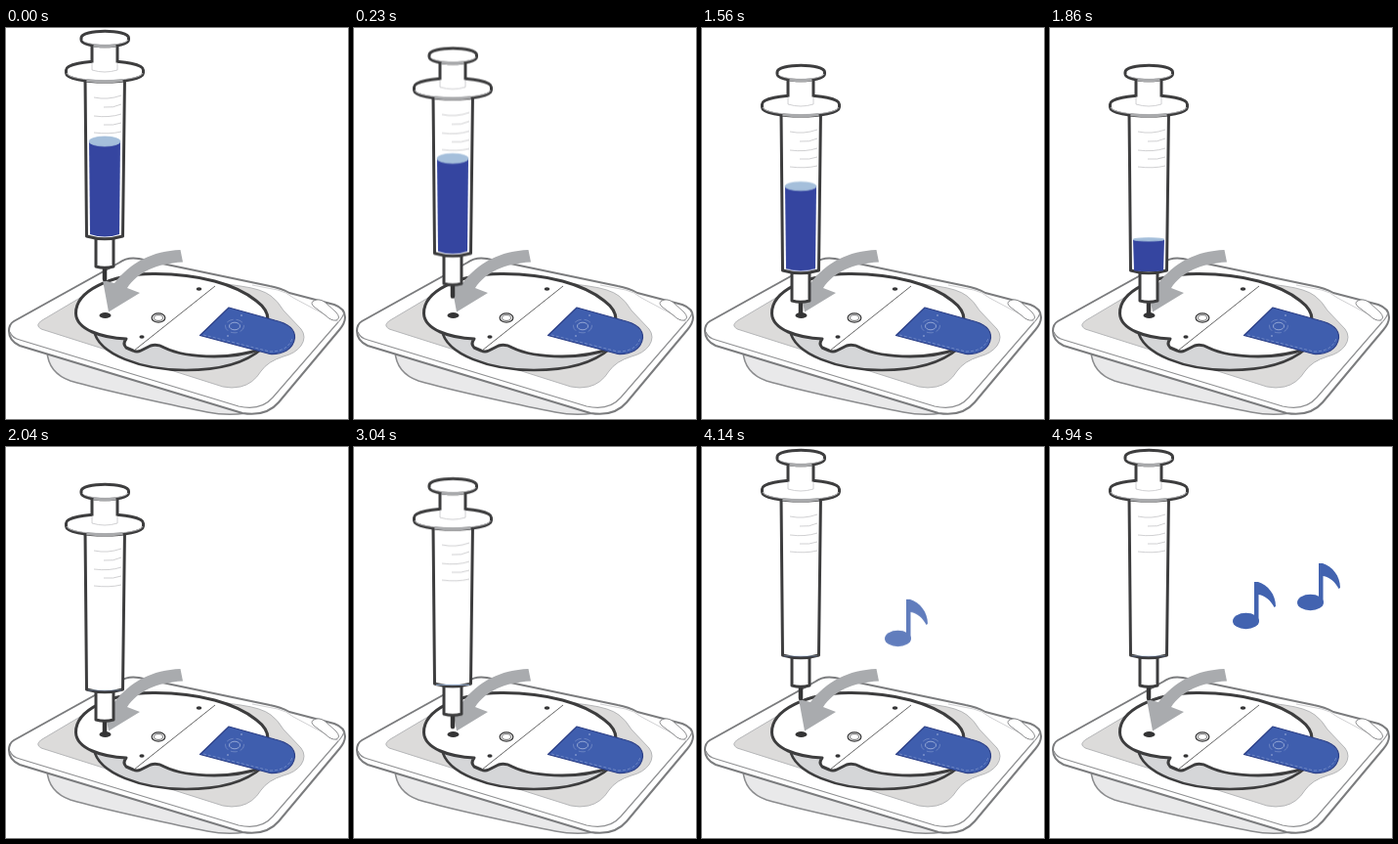
Recreate the animation shown at these times as an HTML page. Size 350 px wide and 400 px high, loop 6.94 s.

```html
<!DOCTYPE html>
<html lang="en">
<head>
<meta charset="utf-8">
<title>Filling a cartridge</title>
<style>
html, body { margin: 0; width: 100%; height: 100%; overflow: hidden; background: #fff; }
svg { display: block; width: 350px; height: 400px; }
.rim { fill: #fff; stroke: #7b7c7e; stroke-width: 2; stroke-linejoin: round; }
.thin { fill: none; stroke: #8f9092; stroke-width: 1.2; }
.bold { fill: #fff; stroke: #3d3d3e; stroke-width: 3; stroke-linejoin: round; }
.lip { fill: none; stroke: #a9aaac; stroke-width: 3; }
.mark { fill: none; stroke: #c4c5c7; stroke-width: .8; }
.dark { fill: #343435; }
.note { fill: #4263b0; opacity: 0; }
#liquid { transform-origin: 0 214.5px; }
</style>
</head>
<body>
<svg viewBox="0 0 350 400">
  <defs>
    <g id="noteShape">
      <ellipse cx="200.5" cy="178" rx="13.5" ry="8.2"/>
      <path d="M209 138H213C223 141 231 151 231 163L229.500 164C226 157 220 152 213.500 151V178H209Z"/>
    </g>
  </defs>

  <g id="tray">
    <path d="M42 331C43 347 52 356 66 361C100 371 185 389 206 393Q226 397 246 394L220 378Z"
      fill="#e9e9ea" stroke="#8b8c8e" stroke-width="1.600"/>
    <path class="rim" d="M8 300L116 240Q124 234 136 236L270 264Q281 266 290 271L336 283Q347 287 347 296
      Q347 302 341 309L279 383Q266 398 242 394L14 325Q3 320 3 310Q3 303 8 300Z"/>
    <path class="thin" d="M4 311Q6 317 14 319L238 387Q261 392 273 378L339 302Q345 296 346 291"/>
    <path d="M37 299L91 267L140 250L240 264Q262 267 271 274Q278 279 284 289L302 308Q308 316 302 325
      Q296 333 284 336Q268 341 261 351Q253 364 240 367Q231 369 222 367L36 308Q29 304 37 299Z"
      fill="#dcdbda" stroke="#a8a9ab" stroke-width=".8"/>
    <path class="mark" d="M252 263L278 268Q287 270 294 276L341 301"/>
    <path d="M315 279Q321 276 327 281L338 291Q343 297 338 299Q333 300 327 294L315 285Q311 281 315 279Z"
      fill="#fff" stroke="#8b8c8e"/>
  </g>

  <g id="cartridge">
    <path class="bold" style="fill:#d5d6d8;stroke-width:2.500"
      d="M90 309C94 334 139 350 184 350C222 350 246 342 262 328L230 290L110 300Z"/>
    <path class="bold" d="M71.500 292C71 269 107 252 150 251.500C198 251 236 263 256 279Q268 288 268 298
      L262 328Q240 336 213 336C190 336 174 333 162 327Q155 323 148 325L138 330Q134 332 130 330L123 327
      Q119 323 123 318C99 317 72 309 71.500 292Z"/>
    <path d="M214 264L131 330" stroke="#555" stroke-width=".9"/>
    <ellipse class="dark" cx="101.500" cy="294" rx="6" ry="3"/>
    <ellipse class="dark" cx="197.500" cy="267" rx="2.800" ry="1.800"/>
    <ellipse class="dark" cx="139" cy="316" rx="2.600" ry="1.800"/>
    <ellipse cx="156" cy="296.500" rx="6.800" ry="4.600" fill="#fff" stroke="#343435" stroke-width="1.300"/>
    <ellipse cx="156" cy="296.500" rx="4.600" ry="2.900" fill="none" stroke="#343435" stroke-width=".7"/>
    <path d="M228 286L275 299C288 302 296 308 295.500 317C294 329 283 334 270 333.500L198.500 314.500Z"
      fill="#3f5eae" stroke="#2c3f86" stroke-width="1.200" stroke-linejoin="round"/>
    <path d="M202 314L270 331Q289 331 293 317" fill="none" stroke="#8fa3d3" stroke-width=".6" stroke-dasharray="3 2"/>
    <g fill="none" stroke="#a9b9df" stroke-width=".8">
      <ellipse cx="234" cy="305" rx="5.500" ry="3.800"/>
      <ellipse cx="234" cy="305" rx="9.500" ry="6.800" stroke-dasharray="7 3" stroke-width=".4"/>
    </g>
    <g fill="#a9b9df"><circle cx="241" cy="294" r=".8"/><circle cx="227" cy="315" r=".8"/></g>
  </g>

  <path fill="#a9abae" d="M178.500 227C150 228 127 240 111 261L99 258L105 290.500L137 271L124 266
    C135 250 153 241 181 239.500Z"/>

  <g id="syringe">
    <path d="M101 244V257" stroke="#343435" stroke-width="4.500" stroke-linecap="round"/>
    <path class="bold" d="M92 214V244Q101 246.500 110 244V214Z"/>
    <path class="bold" d="M81 50L82.500 213Q101 218.500 119.500 213L121.500 50"/>
    <path class="mark" d="M90 71Q104 74 118 69M100 81Q110 82 118 78M90 90Q106 92 118 88
      M100 99Q110 100 118 97M90 107Q106 109 118 106"/>
    <g id="liquid">
      <path fill="#3545a0" d="M85 116L86 211Q101 216 116 211L117 116Z"/>
      <ellipse cx="101" cy="116" rx="16" ry="5" fill="#a5bfdb" stroke="#a5bfdb" stroke-width=".8"
        vector-effect="non-scaling-stroke"/>
    </g>
    <path class="bold" d="M61.500 43C61.500 31 140.500 31 140.500 43V46C140.500 58 61.500 58 61.500 46Z"/>
    <path class="mark" d="M62 46C64 56 138 56 140 46"/>
    <path class="lip" d="M82.500 53.500Q101 56 119.500 53.500"/>
    <path d="M88 14V43Q101 47 114 43V14Z" fill="#fff"/>
    <path class="mark" d="M88 35V43Q101 47 114 43V35"/>
    <path class="bold" style="fill:none" d="M88 14V35.500M114 14V35.500"/>
    <path class="bold" d="M77 10C77 1 125.500 1 125.500 10V12C125.500 21 77 21 77 12Z"/>
    <path class="mark" d="M78 12C81 19 122 19 125 12"/>
    <path class="lip" d="M89.500 18Q101 19.500 112.500 18"/>
  </g>

  <g class="note" id="note1"><use href="#noteShape"/></g>
  <g class="note" id="note2"><use href="#noteShape" x="66" y="-19"/></g>
</svg>
<script>
const LOOP = 6940;
const EARLY = 2; // keeps each step clear of rounding at its boundary

// Each move: [start ms, step count, step ms, from, to]
function play(id, moves) {
  const frames = [{ offset: 0, ...moves[0][3] }];
  for (const [start, count, step, from, to] of moves) {
    const begin = start - EARLY;
    frames.push(
      { offset: begin / LOOP, easing: `steps(${count}, start)`, ...from },
      { offset: (begin + count * step) / LOOP, ...to });
  }
  frames.push({ offset: 1, ...moves[moves.length - 1][4] });
  document.getElementById(id).animate(frames, { duration: LOOP, iterations: Infinity });
}

const shift = y => ({ transform: `translateY(${y}px)` });
const level = s => ({ transform: `scaleY(${s})` });
const faded = y => ({ opacity: 0, ...shift(y) });
const shown = { opacity: 1, ...shift(0) };

play('syringe', [
  [30, 6, 100, shift(0), shift(35)],
  [3040, 6, 100, shift(35), shift(0)],
]);
play('liquid', [[1530, 18, 30, level(1), level(0.005)]]);
play('note1', [[3740, 6, 100, faded(107), shown]]);
play('note2', [[4440, 6, 100, faded(149), shown]]);
</script>
</body>
</html>
```
